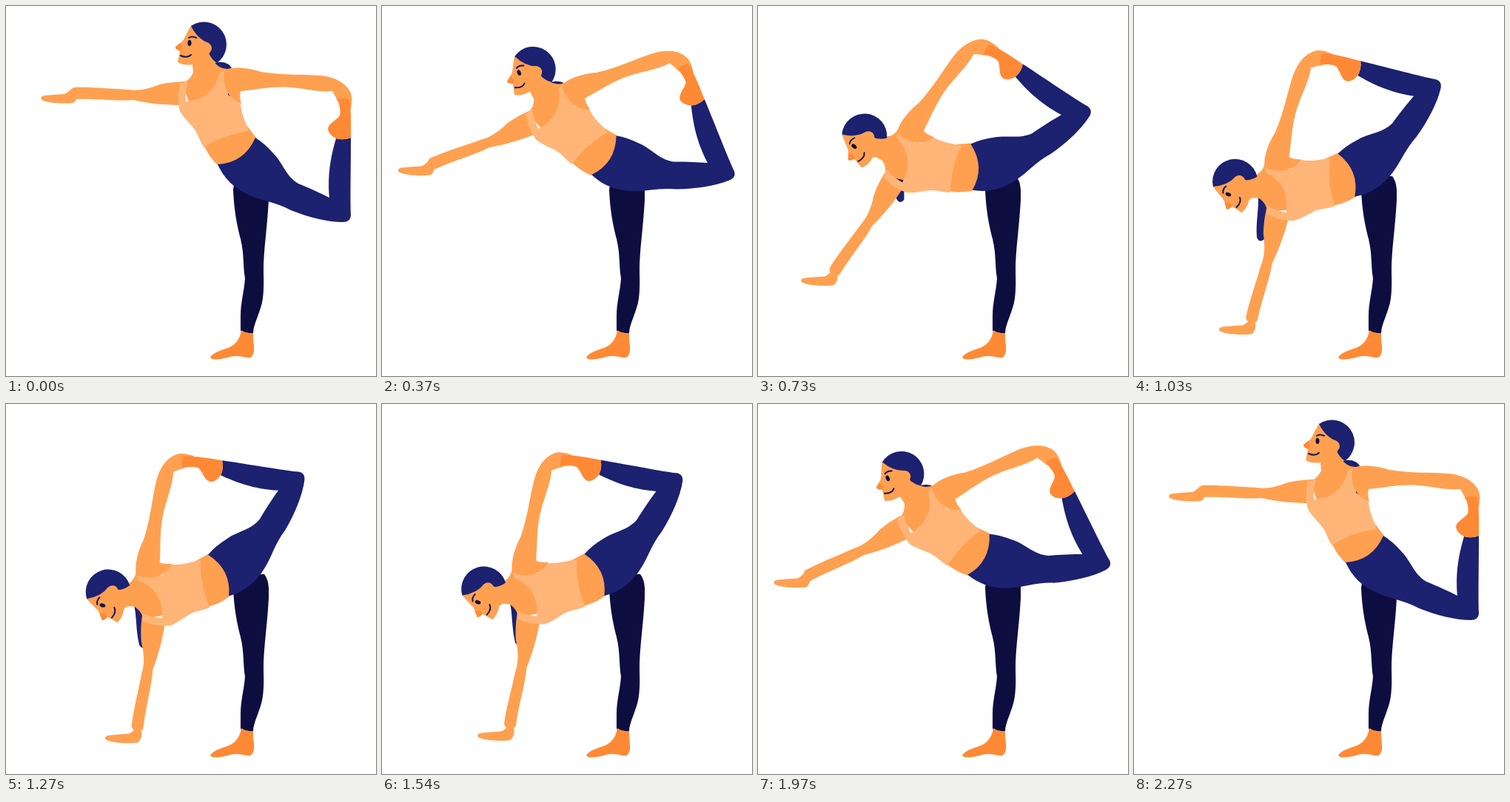
These frames come from a looping animation (500x500 px, 3.24 s). An HTML page:

```html
<!DOCTYPE html>
<html lang="en">
<head>
<meta charset="utf-8">
<title>Dancer stretch</title>
<style>
  html, body { margin: 0; width: 100%; height: 100%; overflow: hidden; background: #fff; }
  svg { display: block; width: 100vw; height: 100vh; }
  .skin { fill: #ffa051; }
  .light { fill: #ffb577; }
  .foot { fill: #ff8935; }
  .navy { fill: #1c2170; }
  .dark { fill: #0e0d40; }
  .line { fill: none; stroke: #15154f; stroke-width: 2; stroke-linecap: round; }
</style>
</head>
<body>
<svg viewBox="0 0 500 500">
  <!-- standing leg -->
  <path class="dark" d="M310 230L307 248C308 275 312 296 317 315C322 335 320 350 323 368C322 385 317 400 317 420V439Q325 443 334 442C334 430 345 412 347 395C349 380 348 368 348 355C348 330 353 300 355 262V248Q354 236 349 230Z"/>
  <path class="foot" d="M318 438C316 452 308 460 297 463C288 466 278 470 276 475C279 479 290 478 303 474C315 471 322 476 330 475C336 472 336 462 334 452V442Q325 443 318 438Z"/>

  <!-- everything that tips over the hip -->
  <g id="body">
    <g id="tail">
      <path class="navy" transform="translate(281 80)" d="M-3 -2C8 -6 22 -2 24 8C16 30 18 55 14 84Q8 90 4 82C1 60 5 40 2 25Z"/>
    </g>
    <path class="skin" d="M246 102C232 102 222 103 208 106C190 113 178 115 165 113C140 112 112 109 92 110Q80 118 92 126C125 125 150 129 172 127C195 132 215 134 240 134Z"/>
    <path id="hand" class="skin" d="M93 110C86 112 84 118 78 119C68 120 54 120 49 122C46 124 47 127 51 128C62 132 80 132 90 131C94 130 94 127 96 124Q98 115 93 110Z"/>
    <path class="skin" d="M251 70L253 90Q248 101 238 104L265 182C271 198 277 206 286 215L318 216L338 178L328 165L300 130V85Q288 86 278 72Z"/>
    <path class="light" d="M235 104C232 118 232 132 235 142C243 156 254 162 259 174Q263 184 267 191Q295 173 328 169C325 158 318 148 317 132L300 120L298 86L289 90C284 110 272 127 243 129Q242 112 246 102Z"/>
    <path class="navy" d="M286 214C294 232 308 247 330 256C345 263 365 265 385 276C410 286 435 292 455 292Q466 292 466 282C465 262 466 220 466 178Q456 182 446 179C440 200 434 225 437 259C425 253 410 246 395 240C378 230 374 212 362 200Q350 186 337 178Q322 212 286 214Z"/>
    <path class="skin" d="M296 86C310 81 330 84 345 89C375 94 400 92 425 94C445 96 458 104 464 114C469 122 467 132 466 140Q463 133 456 134Q448 133 446 124L441 115C425 117 400 111 385 110C360 108 340 113 317 115Q315 122 318 132Q298 124 295 104Q293 95 296 86Z"/>
    <path class="foot" d="M466 178C466 165 467 145 464 126Q456 123 449 126C450 135 453 142 451 148C446 155 436 158 435 166Q436 174 446 179Q456 182 466 178Z"/>
    <g id="head">
      <path class="skin" d="M250 27C244 36 241 45 238 48L229 55Q228 58 235 61L232 76Q240 81 252 79L262 86L283 78L285 50Z"/>
      <path class="foot" d="M236 50L229 55Q228 58 236 61L238 57Z"/>
      <path class="navy" d="M250 27A29 29 0 0 1 285 77Q280 74 275 66L274 50Q259 45 250 27Z"/>
      <ellipse class="skin" cx="271" cy="57" rx="7" ry="7.5"/>
      <ellipse class="dark" cx="248" cy="50" rx="2.5" ry="4"/>
      <path class="line" d="M247 43Q251 40 257 43M236 67Q245 71 250 66"/>
    </g>
  </g>
</svg>
<script>
const LOOP = 3240, STEP = 33.4;   // ms
const TILT = 81.5;                // degrees at the deepest point
const DOWN = 1200, UP = 800, RISE = 1477, REST = 2265;

// Cubic ease with starting speed v
function ease(x, v = 0) {
  x = Math.min(1, Math.max(0, x));
  return v * x * (1 - x) ** 2 + x * x * (3 - 2 * x);
}

function tilt(t) {
  if (t > REST) return 0;
  return TILT * (ease(t / DOWN, .35) - ease((t - RISE) / UP));
}

function turn(id, angle, x, y) {
  document.getElementById(id).setAttribute('transform', `rotate(${angle} ${x} ${y})`);
}

function draw(now) {
  const t = Math.floor((now % LOOP + 4) / STEP) * STEP;
  const a = tilt(t);
  const sway = 10 * Math.exp(-(((t - 1030) / 120) ** 2));
  turn('body', -a, 320, 228);
  turn('hand', a, 87, 115);               // stays level
  turn('tail', a - 6 + sway, 281, 80);    // hangs straight down
  turn('head', a * .11, 267, 51);
}

const start = performance.now();
function tick() {
  draw(performance.now() - start);
  requestAnimationFrame(tick);
}
tick();
</script>
</body>
</html>
```
